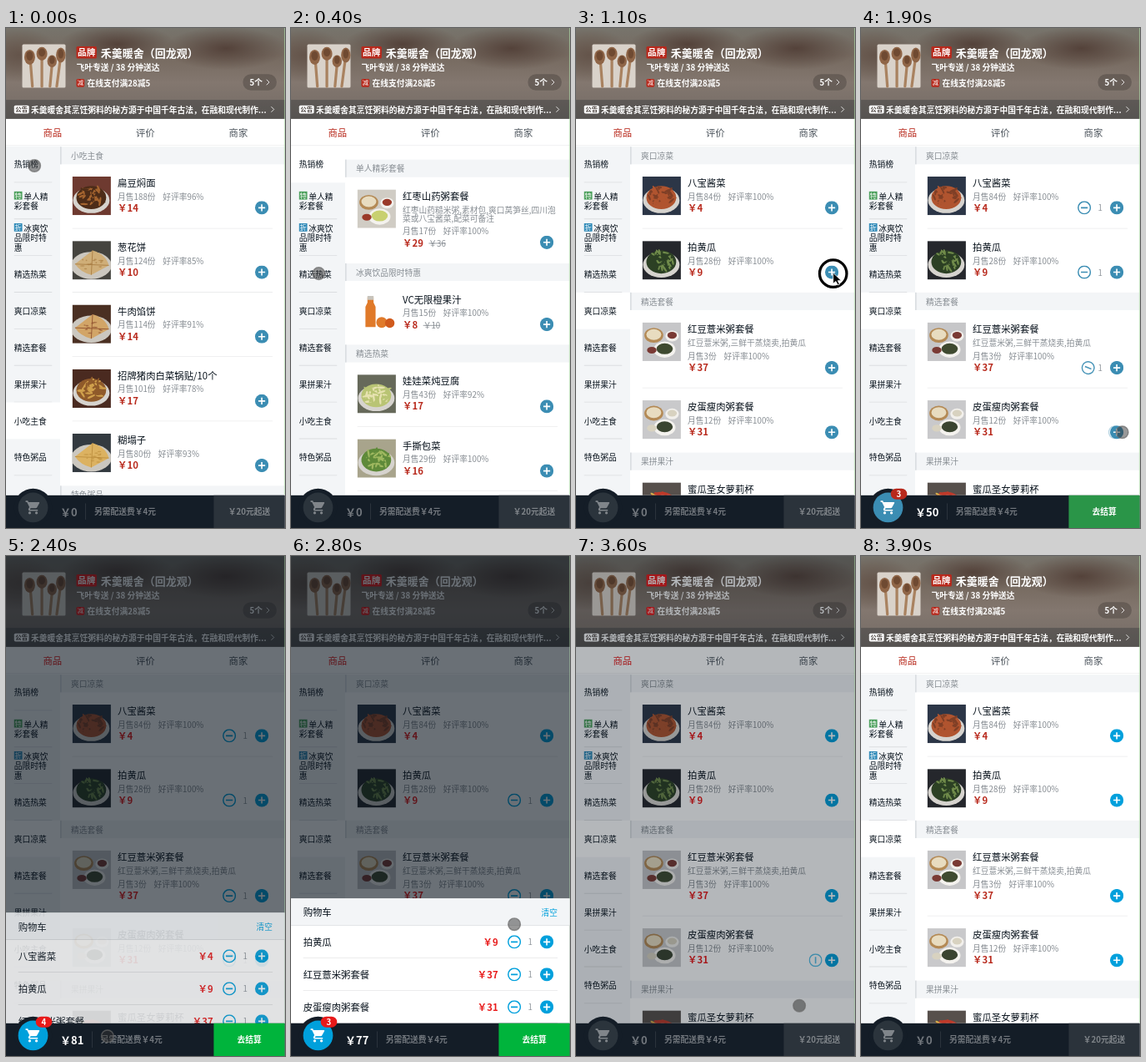
Write an HTML page that moves like this. It is 335 by 599 pixels and loops after 4 s.

```html
<!DOCTYPE html>
<html lang="zh-CN">
<head>
<meta charset="utf-8">
<title>点餐</title>
<style>
html, body { margin: 0; width: 100%; height: 100%; overflow: hidden; background: #fff; }
#app {
  --blue: #3b8db3; --red: #b8291c; --green: #2a9548;
  position: absolute; left: 0; top: 0; width: 412px; height: 738px; overflow: hidden;
  transform: scale(.8125); transform-origin: 0 0;
  font: 12px/1 "Noto Sans CJK SC", "Noto Sans CJK", "Noto Sans", sans-serif;
  color: #07111b; white-space: nowrap;
}
#app div, #app svg { position: absolute; }
.mid { transform: translateY(-50%); }
svg { overflow: visible; }

.header { width: 412px; height: 134px; color: #fff; overflow: hidden; font-weight: 700;
  background:
    radial-gradient(ellipse 85px 30px at 165px 24px, #54423a, transparent),
    radial-gradient(ellipse 90px 32px at 325px 30px, #54423a, transparent),
    radial-gradient(ellipse 60px 40px at 20px 40px, #64544a, transparent),
    linear-gradient(#77746c, #75695f 30%, #83776f 60%, #726a64); }
.tag { background: var(--red); color: #fff; text-align: center; border-radius: 2px; }
.pill { left: 350px; top: 68px; width: 50px; height: 24px; border-radius: 14px;
  background: rgba(0,0,0,.2); line-height: 24px; text-indent: 10px; }
.bulletin { top: 106px; width: 412px; height: 28px; line-height: 28px; background: rgba(7,17,27,.25); }
.tabs { top: 134px; width: 412px; height: 40px; display: flex; font-size: 14px; line-height: 40px;
  text-align: center; color: #4d555d; box-shadow: inset 0 -1px rgba(7,17,27,.1); }
.tabs span { flex: 1; }
.tabs span:first-child { color: var(--red); }

.goods { top: 174px; width: 412px; height: 515px; overflow: hidden; }
.menu { width: 80px; height: 515px; background: #f3f5f7; }
.menu div { width: 80px; height: 54px; }
.menu p { margin: 0 12px; width: 56px; height: 53px; display: flex; align-items: center;
  line-height: 14px; white-space: normal; border-bottom: 1px solid rgba(7,17,27,.1); }
.menu .on { background: #fff; }
.menu .on p { border-color: transparent; }
.menu i { display: inline-block; width: 12px; height: 12px; margin-right: 2px; color: #fff;
  font: 10px/12px "Noto Sans CJK SC", sans-serif; text-align: center; vertical-align: top; }
.foods { left: 80px; width: 332px; }
.foods h2 { position: absolute; margin: 0; width: 316px; height: 26px; padding-left: 14px;
  border-left: 2px solid #d9dde1; font: inherit; line-height: 26px; color: #868c92; background: #f3f5f7; }
.food { width: 332px; }
.food::after { content: ""; position: absolute; left: 18px; right: 18px; bottom: 0;
  border-bottom: 1px solid rgba(7,17,27,.08); }
.food.last::after { display: none; }
.text { left: 85px; top: 20px; width: 229px; color: #868c92; }
.text b { display: block; font-size: 14px; font-weight: 400; line-height: 14px; color: #07111b; margin-bottom: 8px; }
.text p { margin: 0 0 8px; line-height: 12px; white-space: normal; }
.text small { display: block; font-size: 12px; line-height: 10px; word-spacing: 8px; }
.price { font-size: 14px; font-weight: 700; line-height: 24px; color: var(--red); }
.text s { margin-left: 8px; }
.ctl { width: 0; height: 0; }
.ctl svg { width: 20px; height: 20px; margin: -10px; color: var(--blue); }
.ctl span { position: absolute; left: -28px; width: 8px; top: -6px; text-align: center; color: #93999f; }

.mask { top: 0; width: 412px; height: 738px; background: #07111b; }
.panel { width: 412px; background: #fff; }
.panel .top { width: 412px; height: 39px; line-height: 40px; background: #f3f5f7;
  border-bottom: 1px solid rgba(7,17,27,.1); font-size: 14px; text-indent: 18px; }
.panel .top span { position: absolute; right: 18px; font-size: 12px; text-indent: 0; color: var(--blue); }
.row { left: 18px; width: 376px; height: 47px; line-height: 48px; font-size: 14px;
  border-bottom: 1px solid rgba(7,17,27,.1); }
.row .price { position: absolute; right: 88px; line-height: 48px; }

.cart { top: 689px; width: 412px; height: 49px; background: #141d27; color: rgba(255,255,255,.4); font-weight: 700; }
.well { left: 12px; top: -10px; width: 56px; height: 56px; border-radius: 50%; background: #141d27; }
.logo { left: 6px; top: 6px; width: 44px; height: 44px; border-radius: 50%; background: #2b343c; color: #80858a; }
.logo svg { left: 10px; top: 10px; width: 24px; height: 24px; }
.badge { left: 32px; top: 0; width: 24px; height: 16px; border-radius: 16px; background: var(--red);
  color: #fff; line-height: 16px; text-align: center; }
.sum { left: 80px; top: 12px; line-height: 24px; display: flex; }
.sum b { font-size: 16px; padding-right: 12px; margin-right: 12px; border-right: 1px solid rgba(255,255,255,.12); }
.pay { left: 307px; width: 105px; height: 49px; line-height: 48px; text-align: center; background: #2b333b; }
.full .logo { background: var(--blue); color: #fff; }
.full .sum b { color: #fff; }
.ready .pay { background: var(--green); color: #fff; }
</style>
</head>
<body>
<svg width="0" height="0" style="position:absolute">
  <symbol id="plus" viewBox="0 0 20 20"><circle cx="10" cy="10" r="10" fill="currentColor"/><path d="M5 10h10M10 5v10" stroke="#fff" stroke-width="2"/></symbol>
  <symbol id="minus" viewBox="0 0 20 20"><circle cx="10" cy="10" r="9" fill="#fff" fill-opacity=".6" stroke="currentColor" stroke-width="1.8"/><path d="M5 10h10" stroke="currentColor" stroke-width="2"/></symbol>
</svg>
<div id="app">
  <div class="header">
    <svg style="left:24px;top:24px" width="64" height="64" viewBox="0 0 64 64">
      <rect width="64" height="64" rx="2" fill="#d9d2ca"/>
      <g stroke-linecap="round" stroke-width="4" stroke="#a98260"><path d="M12 24L15 62M29 22V62M44 30L41 62M56 24L51 62"/></g>
      <g fill="#8f6547"><ellipse cx="11" cy="19" rx="8" ry="11"/><ellipse cx="29" cy="14" rx="8" ry="10"/><ellipse cx="44" cy="25" rx="7" ry="9"/><ellipse cx="57" cy="16" rx="7" ry="11"/></g>
      <g fill="#6f4a32"><ellipse cx="11" cy="17" rx="5" ry="7"/><ellipse cx="29" cy="12" rx="5" ry="6"/><ellipse cx="44" cy="23" rx="4" ry="6"/><ellipse cx="57" cy="14" rx="4" ry="7"/></g>
    </svg>
    <div class="tag" style="left:104px;top:27px;width:30px;font-size:13px;line-height:18px">品牌</div>
    <div class="mid" style="left:140px;top:36px;font-size:16px">禾羹暖舍（回龙观）</div>
    <div class="mid" style="left:104px;top:58px">飞叶专送 / 38 分钟送达</div>
    <div class="tag" style="left:104px;top:75px;width:12px;font-size:9px;font-weight:400;line-height:12px">减</div>
    <div class="mid" style="left:120px;top:80.5px">在线支付满28减5</div>
    <div class="pill">5个<svg style="left:35px;top:8px" width="5" height="8"><path d="M0 0l4 4-4 4" fill="none" stroke="#fff"/></svg></div>
    <div class="bulletin">
      <div style="left:12px;top:8px;width:22px;font-size:9px;line-height:12px;text-align:center;background:#fff;color:#4a423e;border-radius:2px">公告</div>
      <div style="left:37px">禾羹暖舍其烹饪粥料的秘方源于中国千年古法，在融和现代制作...</div>
      <svg style="left:392px;top:10px" width="5" height="8"><path d="M0 0l4 4-4 4" fill="none" stroke="#fff"/></svg>
    </div>
  </div>
  <div class="tabs"><span>商品</span><span>评价</span><span>商家</span></div>
  <div class="goods"><div class="foods" id="foods"></div><div class="menu" id="menu"></div></div>
  <div style="left:411px;top:0;width:1px;height:688px;background:rgba(110,190,100,.6)"></div>
  <div class="mask" id="mask"></div>
  <div class="panel" id="panel"></div>
  <div class="cart" id="cart">
    <div class="sum"><b id="total"></b><span>另需配送费￥4元</span></div>
    <div class="pay" id="pay"></div>
    <div class="well">
      <div class="logo"><svg viewBox="0 0 24 24" fill="currentColor"><path d="M7 18a2 2 0 1 0 .01 0zM17 18a2 2 0 1 0 .01 0zM1 2v2h2l3.6 7.6-1.4 2.4c-.7 1.3.3 3 1.8 3h12v-2H7.4l1.1-2H16c.8 0 1.4-.4 1.7-1l3.6-6.5A1 1 0 0 0 20.4 4H5.2l-.9-2z"/></svg></div>
      <div class="badge" id="badge"></div>
    </div>
  </div>
  <svg id="touch" width="1" height="1"><circle r="9" fill="rgba(50,50,50,.5)" stroke="rgba(105,105,105,.7)" stroke-width="1.8"/></svg>
  <svg id="arrow" width="1" height="1"><circle r="20" fill="none" stroke="#000" stroke-width="4"/><path d="M0-1V15L4 11.500L7 17L9.500 16L7 10.500H12Z" fill="#000" stroke="#fff"/></svg>
</div>
<script>
const $ = id => document.getElementById(id);
const SCALE = .8125, STEP = 100, STEPS = 40;
const clamp = v => Math.max(0, Math.min(1, v));

// name price sold rating picture backdrop main accent description old-price
const dishes = `
皮蛋瘦肉粥 10 229 100 heap #6b5a48 #e6dcc0 #7a6a50 咸粥
扁豆焖面 14 188 96 heap #6e3a30 #a5642f #4d2c18
葱花饼 10 124 85 flat #45443f #cfae78 #a5793f
牛肉馅饼 14 114 91 flat #4a2f22 #d2a567 #8a4a2a
招牌猪肉白菜锅贴/10个 17 101 78 heap #4a2a20 #d0a04c #8f5a2a
南瓜粥 9 91 100 heap #8a7a60 #e2a53a #c98424 甜粥
红豆薏米美肤粥 12 86 100 heap #77685c #8a4038 #c9b0a0 甜粥
八宝酱菜 4 84 100 heap #2c3647 #7f3f26 #b0542f
红枣山药糙米粥 10 81 91 heap #8a8578 #d9c7a0 #8a3a2c
糊塌子 10 80 93 flat #333a40 #dcb261 #b98a3a
红枣山药粥套餐 29 17 100 set #d0ccc4 #9a3a2a #c8d070 红枣山药糙米粥,素材包,爽口莴笋丝,四川泡菜或八宝酱菜,配菜可备注 36
VC无限橙果汁 8 15 100 juice #ffffff #e07a2a #d05a1c - 10
娃娃菜炖豆腐 17 43 92 heap #66695a #e6e2b0 #b9c474
手撕包菜 16 29 100 heap #a8a48c #9fb860 #5f8a3a
香酥黄金鱼/3条 11 15 100 heap #6a4a38 #c98a3a #8f5a24
拍黄瓜 9 28 100 heap #25272c #6f8a4a #2c4024
红豆薏米粥套餐 37 3 100 set #c6c6c8 #7a3a34 #3f4a30 红豆薏米粥,三鲜干蒸烧卖,拍黄瓜
皮蛋瘦肉粥套餐 31 12 100 set #c9c9cb #d8d2c0 #3a4430
蜜瓜圣女萝莉杯 6 1 100 heap #57504c #d8b04a #c03a2a
草本凉茶 6 7 100 juice #f4f0ea #a8322a #d0a040`.trim().split('\n').map((line, i) => {
  const [name, price, sold, rate, kind, bg, a, b, desc = '-', old] = line.split(' ');
  return { name, price: +price, sold, rate, kind, bg, a, b, desc: desc === '-' ? '' : desc, old, seed: i + 1 };
});
const dish = name => dishes.find(d => d.name === name);
const sections = [
  ['热销榜', dishes.slice(0, 10)],
  ['单人精彩套餐', [dish('红枣山药粥套餐')], '特', '#4a9f5a'],
  ['冰爽饮品限时特惠', [dish('VC无限橙果汁')], '折', '#2f8ab8'],
  ['精选热菜', dishes.slice(12, 15)],
  ['爽口凉菜', [dish('八宝酱菜'), dish('拍黄瓜')]],
  ['精选套餐', dishes.slice(16, 18)],
  ['果拼果汁', [dish('蜜瓜圣女萝莉杯'), dish('草本凉茶'), dish('VC无限橙果汁')]],
  ['小吃主食', [...dishes.slice(1, 5), dish('糊塌子')]],
  ['特色粥品', [0, 5, 6, 8].map(i => dishes[i])]
];

// add and remove moments, in steps
const orders = [['八宝酱菜', 12.5, 27], ['拍黄瓜', 15, 30], ['红豆薏米粥套餐', 17.5, 34], ['皮蛋瘦肉粥套餐', 18.9, 36]]
  .map(([name, from, to]) => ({ dish: dish(name), from, to }));

function random(seed) {
  let s = seed * 7919;
  return () => (s = (s * 16807 + 11) % 2147483647) / 2147483647;
}
const oval = (x, y, rx, ry, fill, extra = '') => `<ellipse cx="${x}" cy="${y}" rx="${rx}" ry="${ry}" fill="${fill}" ${extra}/>`;

const art = {
  heap(d, r) {
    let s = oval(28, 35, 27, 19, '#d6d3ce') + oval(28, 31, 22, 17, d.b);
    for (let i = 0; i < 40; i++) {
      const q = r() * 6.283, l = Math.sqrt(r()), x = 28 + 19 * l * Math.cos(q), y = 29 + 14 * l * Math.sin(q);
      s += oval(x, y, 3 + r() * 4, 1.5, i % 2 ? d.b : d.a, `transform="rotate(${r() * 180} ${x} ${y})"`);
    }
    return s;
  },
  flat(d, r) {
    let s = oval(28, 36, 30, 20, '#cbc7bf') + `<path d="M4 34L30 14Q50 20 54 36L28 50Q12 46 4 34z" fill="${d.a}"/>`;
    for (let i = 0; i < 14; i++) s += oval(14 + r() * 30, 26 + r() * 16, 1 + r() * 3, 1, d.b, 'opacity=".6"');
    return s + `<path d="M4 34L54 36M30 14L28 50" stroke="${d.b}"/>`;
  },
  set(d) {
    return oval(17, 19, 14, 11, '#b48a55') + oval(17, 18, 11, 8, '#e8dcc0') + oval(44, 20, 10, 8, '#f2f0ec') +
      oval(44, 19, 7, 5, d.a) + oval(33, 40, 16, 12, '#f4f2ee') + oval(33, 39, 12, 8, d.b) + oval(14, 41, 7, 5, d.a);
  },
  juice(d) {
    return `<path d="M15 6h9v8l3 6v30H12V20l3-6z" fill="${d.a}"/><path d="M15 4h9v6h-9z" fill="#c8c4bc"/>` +
      oval(36, 43, 8, 8, d.a) + oval(48, 44, 7, 7, d.b);
  }
};
const picture = d => `<svg style="left:18px;top:18px;overflow:hidden" width="57" height="57"><rect width="57" height="57" fill="${d.bg}"/>${art[d.kind](d, random(d.seed))}</svg>`;

function control(p) {
  const minus = p > 0 ? `<svg style="left:-48px;opacity:${.3 + .7 * p};transform:translateX(${48 * (1 - p)}px) rotate(${180 * (1 - p)}deg)"><use href="#minus"/></svg>` : '';
  return minus + (p > .5 ? '<span>1</span>' : '') + '<svg><use href="#plus"/></svg>';
}

// build the list, keeping the top of each section
const tops = [];
let y = 0, html = '';
sections.forEach(([title, list], i) => {
  tops.push(y);
  html += `<h2 style="top:${y}px">${title}</h2>`;
  y += 26;
  list.forEach((d, j) => {
    const extra = d.desc ? (d.desc.length > 20 ? 32 : 20) : 0, h = 94.8 + extra;
    const key = (i === 4 || i === 5) ? `data-dish="${d.name}"` : '';
    html += `<div class="food${j === list.length - 1 ? ' last' : ''}" style="top:${y}px;height:${h}px">${picture(d)}
      <div class="text"><b>${d.name}</b>${d.desc ? `<p>${d.desc}</p>` : ''}<small>月售${d.sold}份 好评率${d.rate}%</small>
      <span class="price">￥${d.price}</span>${d.old ? `<s>￥${d.old}</s>` : ''}</div>
      <div class="ctl" ${key} style="left:297.5px;top:${64.6 + extra}px">${control(0)}</div></div>`;
    y += h;
  });
});
$('foods').innerHTML = html;
$('menu').innerHTML = sections.map(([title, , icon, color], i) =>
  `<div style="top:${54 * i}px"><p><span>${icon ? `<i style="background:${color}">${icon}</i>` : ''}${title}</span></p></div>`).join('');
for (const o of orders) o.node = document.querySelector(`[data-dish="${o.dish.name}"]`);

// [step, value...] stops, linear in between
function at(stops, k) {
  const n = stops.findIndex(s => s[0] > k);
  if (n < 0) return stops[stops.length - 1].slice(1);
  const a = stops[n - 1], b = stops[n], f = (k - a[0]) / (b[0] - a[0]);
  return a.slice(1).map((v, i) => v + (b[i + 1] - v) * f);
}
const scrollStops = [[0, tops[7]], [2, 0], [3, 0], [4, tops[1] - 19], [5, tops[3]], [6, tops[3]], [7, tops[4]]];
const pointerStops = [[0, 34, 165], [2, 34, 165], [4, 33, 294], [5, 33, 294], [6, 33, 338], [7, 33, 338],
  [11, 309, 294], [12, 307, 216], [13, 307, 216], [15, 307, 292], [16, 307, 292], [17, 307, 407], [18, 307, 407],
  [19, 314, 484], [20, 307, 484], [22, 122, 575], [24, 122, 575], [26, 268, 422], [27, 268, 422],
  [29, 268, 461], [31, 268, 461], [32, 268, 487], [33, 268, 500], [34, 268, 500], [35, 268, 539]];
// panel height and mask strength
const panelStops = [[0, 0, 0], [22, 0, 0], [23, .35, .5], [24, .7, 1], [25, 1, 1], [35, 1, 1], [36, .5, .5], [37, 0, 0]];

function draw(k) {
  const [scroll] = at(scrollStops, k), [open, dim] = at(panelStops, k), [px, py] = at(pointerStops, k);
  const style = $('app').style, late = k >= 22;
  style.setProperty('--blue', late ? '#00a0dc' : '#3b8db3');
  style.setProperty('--green', late ? '#00b43c' : '#2a9548');
  style.setProperty('--red', open ? '#e81a1a' : '#b8291c');

  $('foods').style.top = .7 - scroll + 'px';
  const active = tops.filter(t => t <= scroll + .5).length - 1;
  [...$('menu').children].forEach((el, i) => el.classList.toggle('on', i === active));

  for (const o of orders) o.node.innerHTML = control(k < o.to ? clamp((k - o.from) / 1.7) : clamp(1 - (k - o.to + .5)));
  const items = orders.filter(o => k >= o.from + .5 && k < o.to);
  const total = items.reduce((s, o) => s + o.dish.price, 0);
  $('cart').classList.toggle('full', total > 0);
  $('cart').classList.toggle('ready', total >= 20);
  $('total').textContent = '￥' + total;
  $('pay').textContent = total >= 20 ? '去结算' : total ? `还差￥${20 - total}元起送` : '￥20元起送';
  $('badge').textContent = items.length;
  $('badge').style.display = total ? '' : 'none';

  $('mask').style.opacity = .6 * dim;
  const panel = $('panel'), height = 40 + 48 * items.length;
  panel.style.display = open && items.length ? '' : 'none';
  panel.style.top = 688.5 - height * open + 'px';
  panel.style.height = height + 'px';
  panel.style.opacity = open < 1 ? .45 + .5 * open : 1;
  panel.innerHTML = '<div class="top">购物车<span>清空</span></div>' + items.map((o, i) =>
    `<div class="row" style="top:${40 + 48 * i}px">${o.dish.name}<span class="price">￥${o.dish.price}</span>
     <div class="ctl" style="left:359.5px;top:24px;line-height:12px;font-size:12px">${control(1)}</div></div>`).join('');

  const arrow = k >= 9 && k <= 11;
  for (const [id, shown] of [['touch', !arrow && k < 37], ['arrow', arrow]]) {
    const s = $(id).style;
    s.display = shown ? '' : 'none';
    s.left = px / SCALE + 'px';
    s.top = py / SCALE + 'px';
  }
}

let last = -1;
function tick() {
  const k = Math.floor(performance.now() / STEP) % STEPS;
  if (k !== last) draw(last = k);
  requestAnimationFrame(tick);
}
tick();
</script>
</body>
</html>
```
